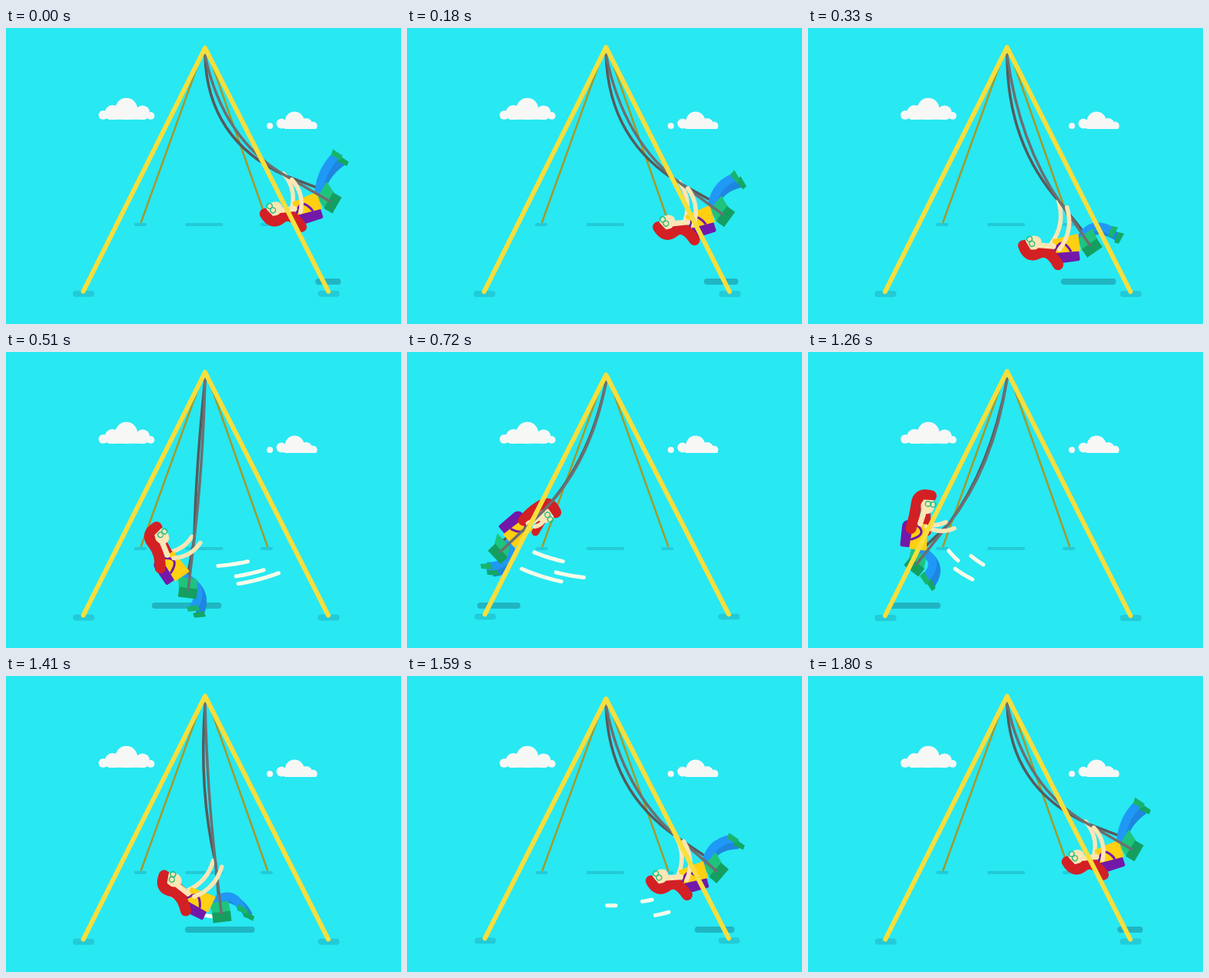
Recreate the animation shown at these times as an HTML page with a canvas. Size 512x384 px, loop 1.83 s.

```html
<!DOCTYPE html>
<html>
<head>
<meta charset="utf-8">
<style>
html, body { margin: 0; width: 100%; height: 100%; overflow: hidden; background: #28e8f2 }
canvas { display: block }
</style>
</head>
<body>
<canvas id="stage" width="512" height="384"></canvas>
<script>
const g = document.getElementById('stage').getContext('2d');
const LOOP = 1830, STEP = 30, TURN = 970;
const SKY = '#28e8f2', SKIN = '#fce6b4', RED = '#d32024', PURPLE = '#7219a9', YELLOW = '#ffcf12';
const rad = deg => deg * Math.PI / 180;
const mix = (a, b, k) => a + (b - a) * k;
const add = ([x, y], dx, dy) => [x + dx, y + dy];
const part = (t, a, b) => Math.min(1, Math.max(0, (t - a) / (b - a)));

function ease(t, a, b, power = 2) {
  const u = part(t, a, b);
  return u < .5 ? (2 * u) ** power / 2 : 1 - (2 - 2 * u) ** power / 2;
}
// 0 at the right end, 1 at the left: leaves during a..b, returns during c..d
const sway = (t, a, b, c, d) => ease(t, a, b) - ease(t, c, d);
// Step from a point: 0 degrees is up, clockwise
const go = ([x, y], deg, len) => [x + len * Math.sin(rad(deg)), y - len * Math.cos(rad(deg))];

function poly(color, ...pts) {
  g.fillStyle = color;
  g.beginPath();
  pts.forEach(p => g.lineTo(...p));
  g.fill();
}
function pen(color, width, cap = 'round') {
  g.strokeStyle = color;
  g.lineWidth = width;
  g.lineCap = cap;
  g.lineJoin = 'round';
  g.beginPath();
}
function line(color, width, ...pts) {
  pen(color, width);
  pts.forEach(p => g.lineTo(...p));
  g.stroke();
}
function curve(color, width, from, ctrl, to, cap) {
  pen(color, width, cap);
  g.moveTo(...from);
  g.quadraticCurveTo(...ctrl, ...to);
  g.stroke();
}
function disc(color, x, y, rx, ry = rx) {
  g.fillStyle = color;
  g.beginPath();
  g.ellipse(x, y, rx, ry, 0, 0, 7);
  g.fill();
}
function at(p, deg, draw) {
  g.save();
  g.translate(...p);
  g.rotate(rad(deg));
  draw();
  g.restore();
}
const pill = (color, x, y, w, h) =>
  line(color, h, [x - (w - h) / 2, y], [x + (w - h) / 2, y]);

function cloud(base, ...puffs) {
  g.save();
  g.beginPath();
  g.rect(0, 0, 512, base);
  g.clip();
  puffs.forEach(p => disc('#f7f8f6', ...p));
  g.restore();
}

// The tent squashes a little under load
function tent(sag, draw) {
  g.save();
  g.translate(258, 260);
  g.scale(1 - .006 * sag, 1 - .02 * sag);
  g.translate(-258, -260);
  draw();
  g.restore();
}

function backdrop() {
  g.fillStyle = SKY;
  g.fillRect(0, 0, 512, 384);
  cloud(118.7, [126, 113, 6], [138, 110, 10], [156, 105, 14.3], [177, 110, 9.5], [187.5, 114, 5], [156, 114, 28, 8]);
  cloud(131, [357, 124, 6.5], [374, 121, 12.5], [389, 125, 8], [398, 127, 5.5], [377, 127, 20, 6], [342, 127, 4]);
  pill('#22cbd7', 257, 255, 49, 4);
}
function rearTent() {
  for (const side of [-1, 1]) {
    pill('#22cbd7', 256 + side * 82, 255, 16, 4);
    pill('#22cbd7', 259.5 + side * 159, 345, 28, 8);
    line('#a29a28', 2.5, [258 + side * 6, 38], [257 + side * 82, 252]);
  }
}

// Streaks: radius, first and last angle; only the part between tail and head shows
function streaks(t, start, span, lag, grow, ...list) {
  const head = part(t, start, start + span), tail = part(t, start + lag, start + lag + span);
  if (head <= tail) return;
  for (const [r, from, to] of list) {
    const pts = [];
    for (let i = 0; i <= 10; i++) {
      const k = mix(tail, head, i / 10);
      pts.push(go([258, 30], 180 - mix(from, to, k), r + grow * (1 - (1 - k) ** 2)));
    }
    line('#f8fbe9', 5, ...pts);
  }
}

function rope(color, hook, bend, grip, end) {
  pen(color, 3.5);
  g.moveTo(...hook);
  g.quadraticCurveTo(...bend, ...grip);
  g.lineTo(...end);
  g.stroke();
}
function arm(from, to) {
  const dx = to[0] - from[0], dy = to[1] - from[1];
  curve(SKIN, 5.5, from, [from[0] + dx / 2 - dy * .25, from[1] + dy / 2 + dx * .25], to);
}
function seatBox(seat, tilt, depth) {
  const l = go(seat, tilt - 90, 12), r = go(seat, tilt + 90, 12);
  poly('#1fc47c', l, r, add(r, ...depth), add(l, ...depth));
  at(seat, tilt, () => poly('#149f60', [-12, -2], [12, -2], [12, 11], [-12, 11]));
}

function legs(t, hip) {
  const knee = go(hip, mix(-2, 174, sway(t, 165, 760, 960, 1680)), 36);
  const shin = mix(46, 280, sway(t, 0, 820, 960, LOOP));
  const shoe = mix(30, 180, sway(t, 0, 620, 960, 1400));
  for (const [off, blue, green] of [[8, '#1e86e0', '#12a862'], [0, '#2098f5', '#18b46c']]) {
    const foot = add(go(knee, shin, 34), off, off);
    curve(blue, 11, hip, add(knee, off / 2, off / 2), foot, 'butt');
    at(foot, shoe, () => poly(green, [-8, -4], [7, -3], [8, 3], [-6, 4]));
  }
}

function body(hip, lean, len) {
  at(hip, lean, () => {
    g.fillStyle = PURPLE;
    g.beginPath();
    g.roundRect(-23, -len - 3, 14, len + 2, [8, 4, 2, 2]);
    g.fill();
    poly(YELLOW, [-11, 1], [12, 1], [9, -len], [-9, -len]);
    curve(PURPLE, 3, [-9, -len * .35], [14, -len * .65], [-8, -len]);
  });
}

function headAndHair(head, neck, lean) {
  const nod = lean * 1.2;
  const local = (x, y) => go(go(head, nod + 90, x), nod, -y);
  pen(RED, 14);
  g.moveTo(...local(5, -12));
  g.quadraticCurveTo(...local(-13, -15), ...local(-13, 1));
  g.quadraticCurveTo(...local(-13, 16), ...add(go(neck, lean - 90, 16), 4, 8));
  g.stroke();
  line(SKIN, 7, head, neck);
  at(head, nod, () => {
    disc(SKIN, 2, 1, 9, 11);
    poly(RED, [-9, -13], [10, -12], [11, -7], [-4, -6], [-8, 2]);
    for (const x of [2, 9]) {
      pen('#27bd83', 1.4);
      g.arc(x, -1, 3.4, 0, 7);
      g.stroke();
    }
  });
}

function rider(t, hook) {
  // Swing runs from 1 at the right to -1 at the left
  const swing = 1 - 2 * (ease(t, 0, TURN, 2.27) - ease(t, TURN, 1815, 2.75));
  const seat = go([258, 30], 180 - 39.7 * swing, 279 - 26 * Math.abs(swing) ** 3);
  const tilt = -60 * swing;
  const grip = go(seat, tilt, 66), bend = go(seat, tilt, 160);
  const depth = [-2 - 8 * swing, -15];

  // She leans forward late on the way left and back early on the way right
  const lean = mix(-108, 62, sway(t, 222, 840, 1000, 1640));
  const hip = add(go(seat, lean, 15), 0, -5);
  const neck = go(hip, lean, 33), head = go(neck, lean + 12, 26);

  pill('#20b5c3', seat[0] - 2, 329, 33 + 58 * (1 - swing ** 2), 8);
  streaks(t, 420, 316, 73, 0, [248, 15, -24], [274, 23, -26], [264, 18.6, -16]);
  streaks(t, 1200, 350, 80, 28, [240, -18.4, 2.7], [239, -11.3, 12.9], [260, -15, 16.4]);

  rope('#565a5c', hook, add(bend, -10 * (swing + 1), 0), grip, add(seat, ...depth));
  arm(add(neck, -3, -3), add(grip, -3, -3));
  line(RED, 10, head, add(neck, 9, 11));
  legs(t, hip);
  seatBox(seat, tilt, depth);
  body(hip, lean, 33);
  headAndHair(head, neck, lean);
  rope('#6c6f70', hook, bend, grip, seat);
  arm(add(neck, 8, 4), add(grip, 8, 5));
}

function draw(now) {
  const t = Math.floor(now % LOOP / STEP) * STEP;
  const sag = Math.sin(2 * Math.PI * (t - 240) / LOOP) ** 6;
  backdrop();
  tent(sag, rearTent);
  rider(t, [258, 35 + 4 * sag]);
  tent(sag, () => line('#f7df3c', 6, [100, 342], [258, 25], [418, 342]));
}

const start = performance.now();
function tick() {
  draw(performance.now() - start);
  requestAnimationFrame(tick);
}
tick();
</script>
</body>
</html>
```
